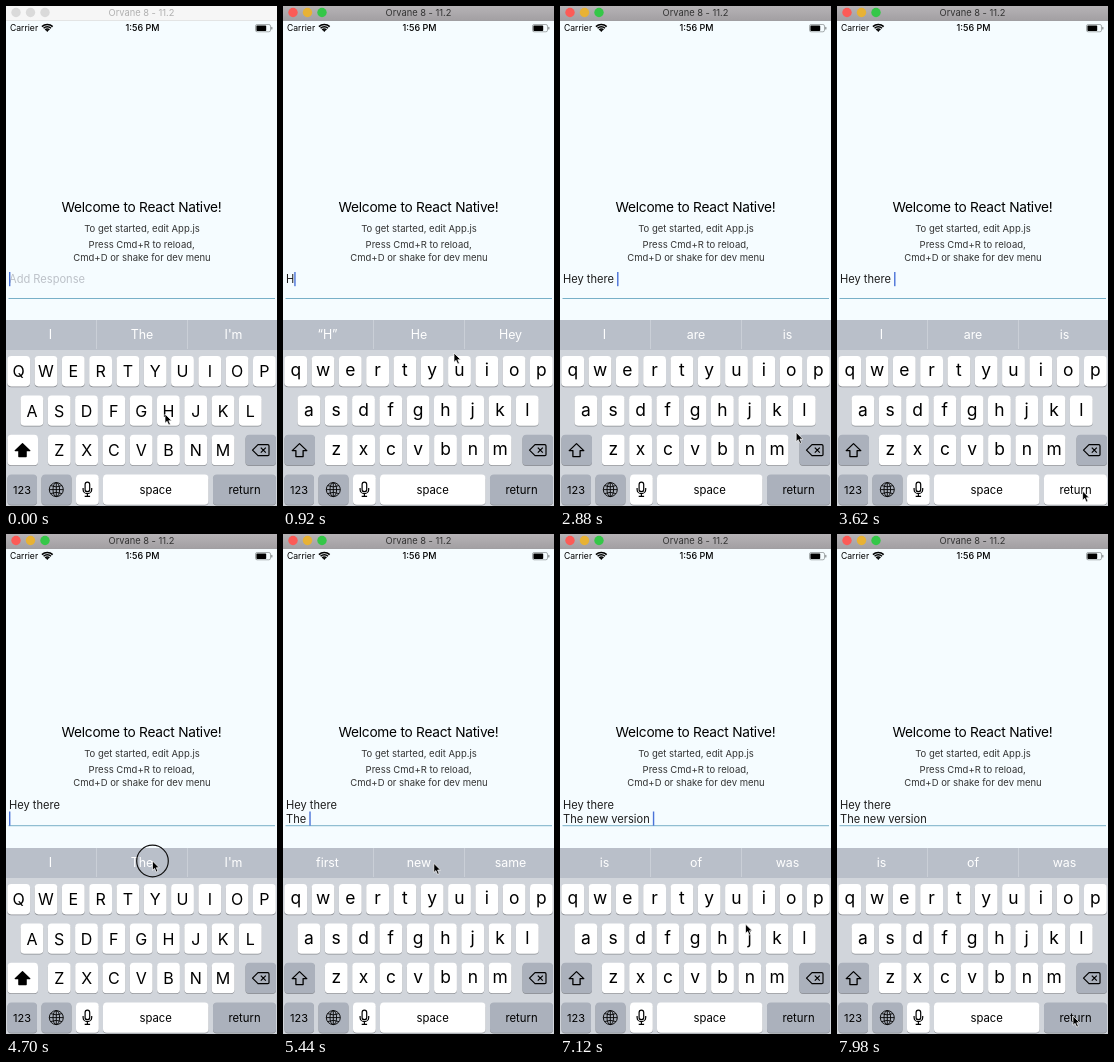
An HTML page with a canvas for the animation above (8 s loop, 271x500 px).

```html
<!DOCTYPE html>
<html lang="en">
<head>
<meta charset="utf-8">
<title>Growing text input</title>
<style>
  html, body { margin: 0; width: 100%; height: 100%; overflow: hidden; background: #f5fcff; }
  canvas { display: block; width: 271px; height: 500px; }
</style>
</head>
<body>
<canvas id="stage"></canvas>
<script>
const LOOP = 8000;
const canvas = document.getElementById('stage');
const ctx = canvas.getContext('2d');
const ratio = window.devicePixelRatio || 1;
canvas.width = Math.round(271 * ratio);
canvas.height = Math.round(500 * ratio);

const states = [
  { at: 0, text: '', caps: true, hints: ['I', 'The', "I'm"] },
  { at: 640, text: 'H', hints: ['“H”', 'He', 'Hey'] },
  { at: 1400, text: 'Hey ', hints: ['I', "I'm", 'there'] },
  { at: 2400, text: 'Hey there ', hints: ['I', 'are', 'is'] },
  { at: 4080, text: 'Hey there\n', caps: true, hints: ['I', 'The', "I'm"] },
  { at: 4960, text: 'Hey there\nThe ', hints: ['first', 'new', 'same'] },
  { at: 6080, text: 'Hey there\nThe new ', hints: ['update', 'version', 'one'] },
  { at: 6660, text: 'Hey there\nThe new version ', hints: ['is', 'of', 'was'] }
];
const ACTIVE_AT = 500, GROW_AT = 4120;

// Mouse stops: time, x, y
const pointerPath = [
  [0, 159, 408], [600, 159, 408], [920, 171, 347], [1220, 226, 330], [1800, 226, 330],
  [2080, 221.5, 335], [2450, 221.5, 335], [3200, 245.6, 485], [4060, 245.6, 485], [4600, 146.5, 327],
  [5000, 146.5, 327], [5800, 154, 331], [6900, 154, 331], [7380, 226, 466], [7700, 236, 482],
  [LOOP, 236, 482]
];
const clicks = [[480, 640], [1240, 1420], [2140, 2400], [3640, 4020], [4660, 4920], [5900, 6080], [6580, 6740]];
// Pressed suggestions: start, end, column
const hintPresses = [[1270, 1400, 2], [2220, 2380, 2], [4740, 4920, 1], [5940, 6060, 1], [6590, 6650, 1]];

const within = (t, [start, end]) => t >= start && t < end;

function text(str, x, y, size, { color = '#000', align = 'left', weight = 400, spacing = 0 } = {}) {
  ctx.font = `${weight} ${size}px Inter, Roboto, sans-serif`;
  ctx.letterSpacing = `${spacing}px`;
  ctx.fillStyle = color;
  ctx.textAlign = align;
  ctx.fillText(str, x, y);
}

function centered(str, x, y, size, style) {
  text(str, x, y, size, { align: 'center', ...style });
}

function rect(x, y, w, h, color) {
  ctx.fillStyle = color;
  ctx.fillRect(x, y, w, h);
}

function rounded(x, y, w, h, r, color) {
  ctx.fillStyle = color;
  ctx.beginPath();
  ctx.roundRect(x, y, w, h, r);
  ctx.fill();
}

function icon(path, x, y, { fill, stroke = '#000', width = 1.2 }) {
  const shape = new Path2D(path);
  ctx.save();
  ctx.translate(x, y);
  ctx.lineWidth = width;
  ctx.lineJoin = 'round';
  if (fill) { ctx.fillStyle = fill; ctx.fill(shape); }
  if (stroke) { ctx.strokeStyle = stroke; ctx.stroke(shape); }
  ctx.restore();
}

function titleBar(active) {
  const shade = ctx.createLinearGradient(0, 0, 0, 14);
  shade.addColorStop(0, active ? '#b6b3b6' : '#f6f6f6');
  shade.addColorStop(1, active ? '#a3a0a3' : '#f6f6f6');
  rect(0, 0, 271, 14.5, shade);
  rect(0, 14, 271, 0.7, active ? '#8f8c8f' : '#dcdcdc');
  const lights = active ? ['#fc5b57', '#e8b234', '#35c748'] : ['#dadada', '#dadada', '#dadada'];
  lights.forEach((color, i) => {
    ctx.fillStyle = color;
    ctx.beginPath();
    ctx.arc(10 + i * 14.5, 6.5, 4.7, 0, 7);
    ctx.fill();
  });
  centered('Orvane 8 - 11.2', 135.5, 10, 9.3, { color: active ? '#333' : '#b0b0b0' });
}

function statusBar() {
  text('Carrier', 4, 25.3, 8.6);
  centered('1:56 PM', 136.5, 25.3, 9, { weight: 500 });
  ctx.strokeStyle = '#000';
  ctx.lineWidth = 1.5;
  for (const r of [3, 5.3, 7.6]) {
    ctx.beginPath();
    ctx.arc(41.3, 26, r, -Math.PI * 0.75, -Math.PI * 0.25);
    ctx.stroke();
  }
  icon('M0 0L-1.5-1.7Q0-2.8 1.5-1.7Z', 41.3, 26, { fill: '#000', stroke: null });
  ctx.strokeStyle = '#858a8c';
  ctx.lineWidth = 0.7;
  ctx.beginPath();
  ctx.roundRect(249.5, 18.5, 15, 7.3, 1.6);
  ctx.stroke();
  rounded(250.4, 19.4, 9.8, 5.5, 0.7, '#000');
  rounded(265.2, 20.8, 1.2, 2.8, 0.6, '#858a8c');
}

function page(t, state) {
  const grown = t >= GROW_AT;
  const lift = grown ? -2.8 : 0;
  const small = { color: '#333' };
  centered('Welcome to React Native!', 135.5, 205.5 + lift, 13.7, { spacing: -0.25 });
  centered('To get started, edit App.js', 136, 226 + lift, 9.5, small);
  centered('Press Cmd+R to reload,', 135.7, 241.8 + lift, 9.5, small);
  centered('Cmd+D or shake for dev menu', 136, 254.5 + lift, 9.5, small);

  const baseline = grown ? 275 : 277.3;
  const lines = state.text.split('\n');
  if (!state.text) text('Add Response', 3, baseline, 11.1, { color: '#bcc1c8' });
  lines.forEach((line, i) => text(line, 3, baseline + i * 13.8, 11.1, { color: '#1c1c1c' }));
  rect(2.5, grown ? 291.2 : 292, 266.5, 1, '#78b0c8');

  const idle = t - state.at - 1280;
  if (idle < 0 || idle % 1000 >= 500) {
    const x = 3 + ctx.measureText(lines.at(-1)).width;
    rect(x, baseline + (lines.length - 1) * 13.8 - 11.3, 1.4, 14.2, '#4a72d8');
  }
}

function suggestions(t, state) {
  rect(0, 314, 271, 30, '#b9bfc9');
  hintPresses.filter(p => within(t, p)).forEach(p => rect(p[2] * 90.5, 314, 90.5, 30, '#d1d5db'));
  rect(90, 314, 0.8, 29, '#cfd4db');
  rect(181, 314, 0.8, 29, '#cfd4db');
  ctx.globalAlpha = state.at ? Math.min(1, (t - state.at) / 150) : 1;
  state.hints.forEach((hint, i) => centered(hint, 44.5 + i * 91.5, 332.5, 12.4, { color: '#fff' }));
  ctx.globalAlpha = 1;
}

function key(x, y, w, color = '#fff') {
  rounded(x, y + 0.8, w, 30.4, 3.8, '#8a8d92');
  rounded(x, y, w, 30.4, 3.8, color);
}

function keyboard(t, state) {
  const dark = '#abb1bc';
  rect(0, 314, 271, 186, '#d1d5db');
  suggestions(t, state);

  [['QWERTYUIOP', 12.7, 350], ['ASDFGHJKL', 25.9, 389.4], ['ZXCVBNM', 53.3, 428.8]].forEach(([row, x, y]) => {
    [...row].forEach((letter, i) => {
      const center = x + i * 27.3;
      key(center - 11.4, y, 22.8);
      if (state.caps) centered(letter, center, y + 21.2, 16);
      else centered(letter.toLowerCase(), center, y + 20.2, 17.4);
    });
  });

  key(1.5, 428.8, 30.5, state.caps ? '#fff' : dark);
  icon('M0-7L7.3 0H3.6V6H-3.6V0H-7.3Z', 16.5, 444.6, { fill: state.caps && '#000', width: 1.3 });
  key(239.5, 428.8, 30.5, dark);
  icon('M-8.3 0L-2.8-5.5H7Q8.2-5.5 8.2-4.3V4.3Q8.2 5.5 7 5.5H-2.8ZM0-2.5L5 2.5M5-2.5L0 2.5', 254.8, 444.2, {});

  key(1.5, 468.4, 29.5, dark);
  centered('123', 16, 487.8, 11);
  key(35.5, 468.4, 30, dark);
  icon('M7 0A7 7 0 1 1-7 0A7 7 0 1 1 7 0M3.3 0A3.3 7 0 1 1-3.3 0A3.3 7 0 1 1 3.3 0M0-7V7M-7 0H7M-5.7-4Q0-1.4 5.7-4M-5.7 4Q0 1.4 5.7 4',
    50.3, 483.6, { width: 0.9 });
  key(70, 468.4, 22.8);
  icon('M-2.3-5A2.3 2.3 0 0 1 2.3-5V0A2.3 2.3 0 0 1-2.3 0ZM-4.3-1.5V0A4.3 4.3 0 0 0 4.3 0V-1.5M0 4.4V7M-2.7 7H2.7', 81.4, 483.4, {});
  key(97, 468.4, 105.5);
  centered('space', 149.7, 487.5, 11.3);
  key(207, 468.4, 63, within(t, [3560, 4060]) ? '#fff' : dark);
  centered('return', 238.5, 487.5, 11.3);
}

function pointer(t) {
  const i = pointerPath.findIndex(p => p[0] > t);
  const [t0, x0, y0] = pointerPath[i - 1];
  const [t1, x1, y1] = pointerPath[i];
  const u = (t - t0) / (t1 - t0);
  const ease = u * u * (3 - 2 * u);
  const x = x0 + (x1 - x0) * ease;
  const y = y0 + (y1 - y0) * ease;
  if (clicks.some(c => within(t, c))) {
    ctx.strokeStyle = '#111';
    ctx.lineWidth = 1.2;
    ctx.beginPath();
    ctx.arc(x, y, 15.8, 0, 7);
    ctx.stroke();
  }
  icon('M0 0V9.3L2.1 7.3L3.7 11L5.4 10.3L3.8 6.7H6.7Z', x, y, { fill: '#000', stroke: '#fff', width: 0.7 });
}

function draw(now) {
  const t = (now - start) % LOOP;
  const state = states.findLast(s => s.at <= t);
  ctx.setTransform(ratio, 0, 0, ratio, 0, 0);
  rect(0, 0, 271, 500, '#f5fcff');
  titleBar(t >= ACTIVE_AT);
  statusBar();
  page(t, state);
  keyboard(t, state);
  pointer(t);
}

let start;
function tick(now) {
  start ??= now;
  draw(now);
  requestAnimationFrame(tick);
}
requestAnimationFrame(tick);
</script>
</body>
</html>
```
